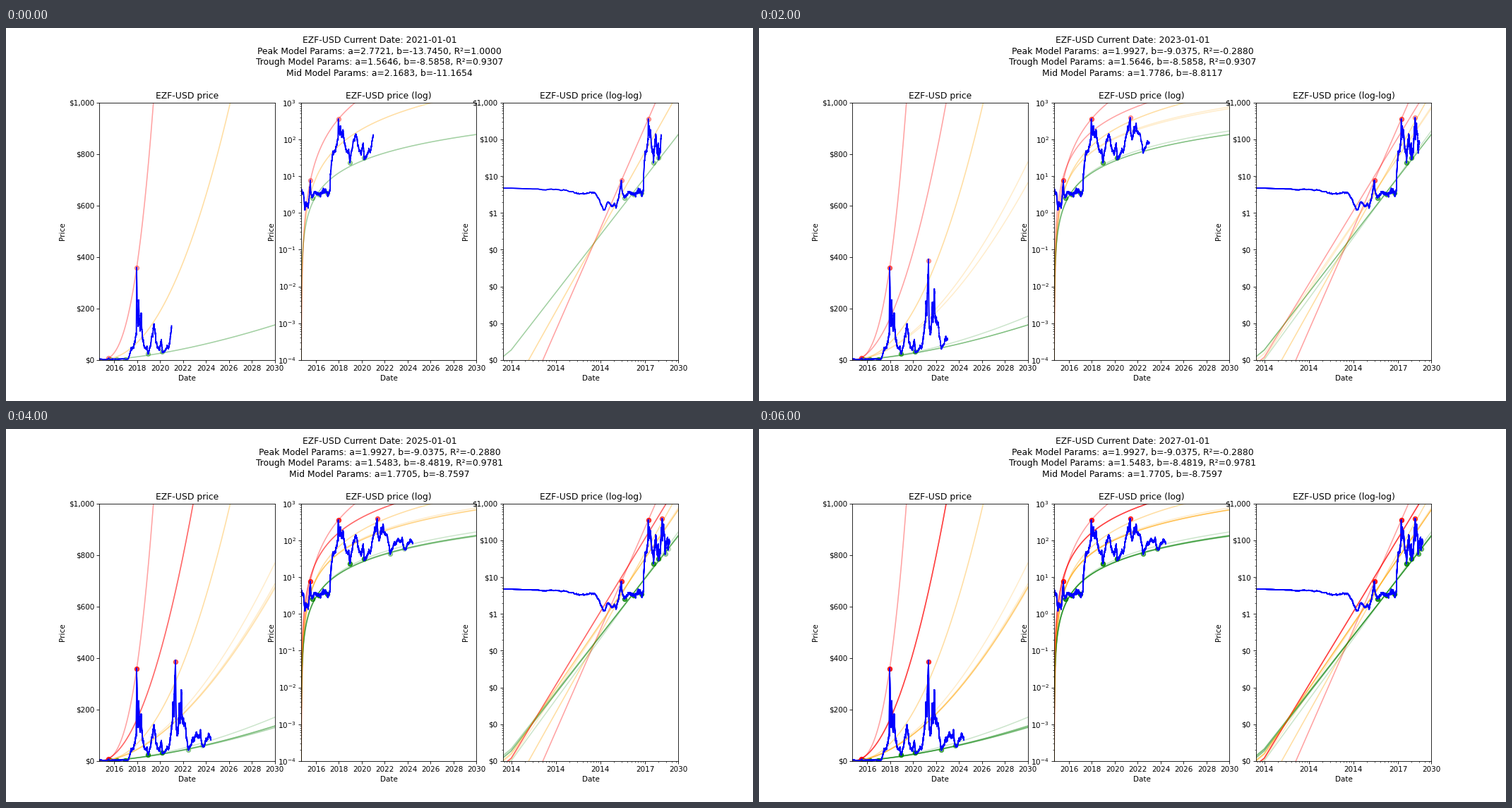
A matplotlib script that plays this animation: 1058 by 529 pixels, repeating every 7000 ms.

```python
import numpy as np
import matplotlib.pyplot as plt
from matplotlib.animation import FuncAnimation
from matplotlib.ticker import FixedLocator, FuncFormatter, NullFormatter

W, H, DPI = 1058, 529, 74.5
TICKER = "EZF-USD"
START = np.datetime64("2014-09-17")
ALPHA = 0.2


def day_of(year):
    return int((np.datetime64(f"{year}-01-01") - START).astype(int))


def year_of(day):
    return str(START + int(day))[:4]


END = day_of(2030)

# Turning points of the price: day since start, price
TURNS = np.array([
    (1, 4.7), (15, 4.3), (20, 3.8), (75, 3.5), (119, 1.2), (145, 1.9),
    (225, 1.4), (295, 7.7), (305, 4), (350, 2.6), (556, 3.2), (831, 3.5),
    (923, 4), (931, 11), (1006, 46), (1093, 46), (1177, 98), (1182, 320),
    (1188, 358), (1200, 225), (1237, 130), (1252, 230), (1297, 115),
    (1326, 172), (1427, 54), (1515, 52), (1549, 23), (1659, 85), (1739, 141),
    (1808, 66), (1917, 39), (1976, 80), (2003, 31), (2198, 46), (2297, 128),
    (2348, 230), (2370, 175), (2403, 310), (2426, 386), (2440, 150),
    (2498, 106), (2545, 225), (2568, 148), (2610, 277), (2662, 146),
    (2751, 126), (2827, 44), (3059, 98), (3210, 112), (3281, 59),
    (3484, 107), (3551, 81),
])


def make_price():
    """Log interpolation between turning points plus a bridged random walk."""
    rng = np.random.default_rng(7)
    turn_days = TURNS[:, 0].astype(int)
    days = np.arange(turn_days[-1] + 1)
    walk = np.cumsum(rng.normal(0, 0.022, days.size)) + rng.normal(0, 0.018, days.size)
    bridge = walk - np.interp(days, turn_days, walk[turn_days])
    bridge[0] = 0
    return days, np.exp(np.interp(days, turn_days, np.log(TURNS[:, 1])) + bridge)


days, price = make_price()

# Day of each extreme and the step at which it is first recognised
PEAKS = {295: 0, 1188: 0, 2426: 1}
TROUGHS = {350: 0, 556: 0, 831: 0, 1549: 0, 2003: 0, 2827: 3, 3281: 4}

# Fitted (a, b, R²) and the mid model's (a, b) for each year
PEAK_A, PEAK_B = (2.7721, -13.7450, 1.0), (1.9927, -9.0375, -0.2880)
TROUGH_A, TROUGH_B = (1.5646, -8.5858, 0.9307), (1.6607, -9.1938, 0.9390)
TROUGH_C, TROUGH_D = (1.5405, -8.4315, 0.9575), (1.5483, -8.4819, 0.9781)
LATEST = (PEAK_B, TROUGH_D, (1.7705, -8.7597))
STEPS = [
    (PEAK_A, TROUGH_A, (2.1683, -11.1654)),
    (PEAK_B, TROUGH_B, (1.8267, -9.1157)),
    (PEAK_B, TROUGH_A, (1.7786, -8.8117)),
    (PEAK_B, TROUGH_C, (1.7666, -8.7345)),
    LATEST, LATEST, LATEST,
]

plt.rcParams["font.family"] = "DejaVu Sans"
fig, axes = plt.subplots(1, 3, figsize=((W + 1e-3) / DPI, (H + 1e-3) / DPI), dpi=DPI)
fig.subplots_adjust(left=0.125, right=0.9, bottom=0.11, top=0.8, wspace=0.15)
linear, semilog, loglog = axes
dollars = FuncFormatter(lambda v, _: f"${v:,.0f}")
years = range(2016, 2031, 2)

for ax, kind in zip(axes, ("", " (log)", " (log-log)")):
    ax.set_title(f"{TICKER} price{kind}")
    ax.set_xlabel("Date")
    ax.set_ylabel("Price")
for ax in (linear, semilog):
    ax.set_xlim(0, END)
    ax.set_xticks([day_of(y) for y in years], [str(y) for y in years])
for ax in (semilog, loglog):
    ax.set_yscale("log")
    ax.set_ylim(1e-4, 1e3)
linear.set_ylim(0, 1000)
linear.yaxis.set_major_formatter(dollars)
loglog.yaxis.set_major_formatter(dollars)
loglog.set_xscale("log")
loglog.set_xlim(END ** -0.05, END)
loglog.xaxis.set_major_locator(FixedLocator([1, 10, 100, 1000, END]))
loglog.xaxis.set_major_formatter(FuncFormatter(lambda v, _: year_of(v)))
loglog.xaxis.set_minor_formatter(NullFormatter())

header = [fig.text(0.5, 1 - (21 + 15.6 * row) / H, "", size=12, ha="center", va="baseline")
          for row in range(4)]
model_days = np.arange(END + 1)


def draw_step(step):
    """Add one translucent layer of models, extremes and price to every panel."""
    peak, trough, mid = STEPS[step]
    shown = days <= day_of(2021 + step)
    layer = []
    for ax in axes:
        for extremes, color in ((PEAKS, "red"), (TROUGHS, "green")):
            found = [d for d, first in extremes.items() if first <= step]
            layer.append(ax.scatter(found, price[found], color=color, alpha=ALPHA))
        for (a, b, *_), color in ((peak, "red"), (trough, "green"), (mid, "orange")):
            curve = np.exp(b) * model_days ** a
            layer += ax.plot(model_days, curve, color=color, alpha=ALPHA)
        layer += ax.plot(days[shown], price[shown], color="blue")
    return layer


# Layers pile up over the years; the first year is laid down twice.
limits = [(ax.get_xlim(), ax.get_ylim()) for ax in axes]
layers = [(step, draw_step(step)) for step in [0, *range(len(STEPS))]]
for ax, (xlim, ylim) in zip(axes, limits):
    ax.set(xlim=xlim, ylim=ylim)


def update(frame):
    for step, layer in layers:
        for artist in layer:
            artist.set_visible(step <= frame)
    peak, trough, mid = STEPS[frame]
    fit = "{} Model Params: a={:.4f}, b={:.4f}, R²={:.4f}"
    lines = (
        f"{TICKER} Current Date: {2021 + frame}-01-01",
        fit.format("Peak", *peak),
        fit.format("Trough", *trough),
        "Mid Model Params: a={:.4f}, b={:.4f}".format(*mid),
    )
    for text, line in zip(header, lines):
        text.set_text(line)
    return header


anim = FuncAnimation(fig, update, frames=len(STEPS), interval=1000, repeat=True, repeat_delay=0)
plt.show()
```
